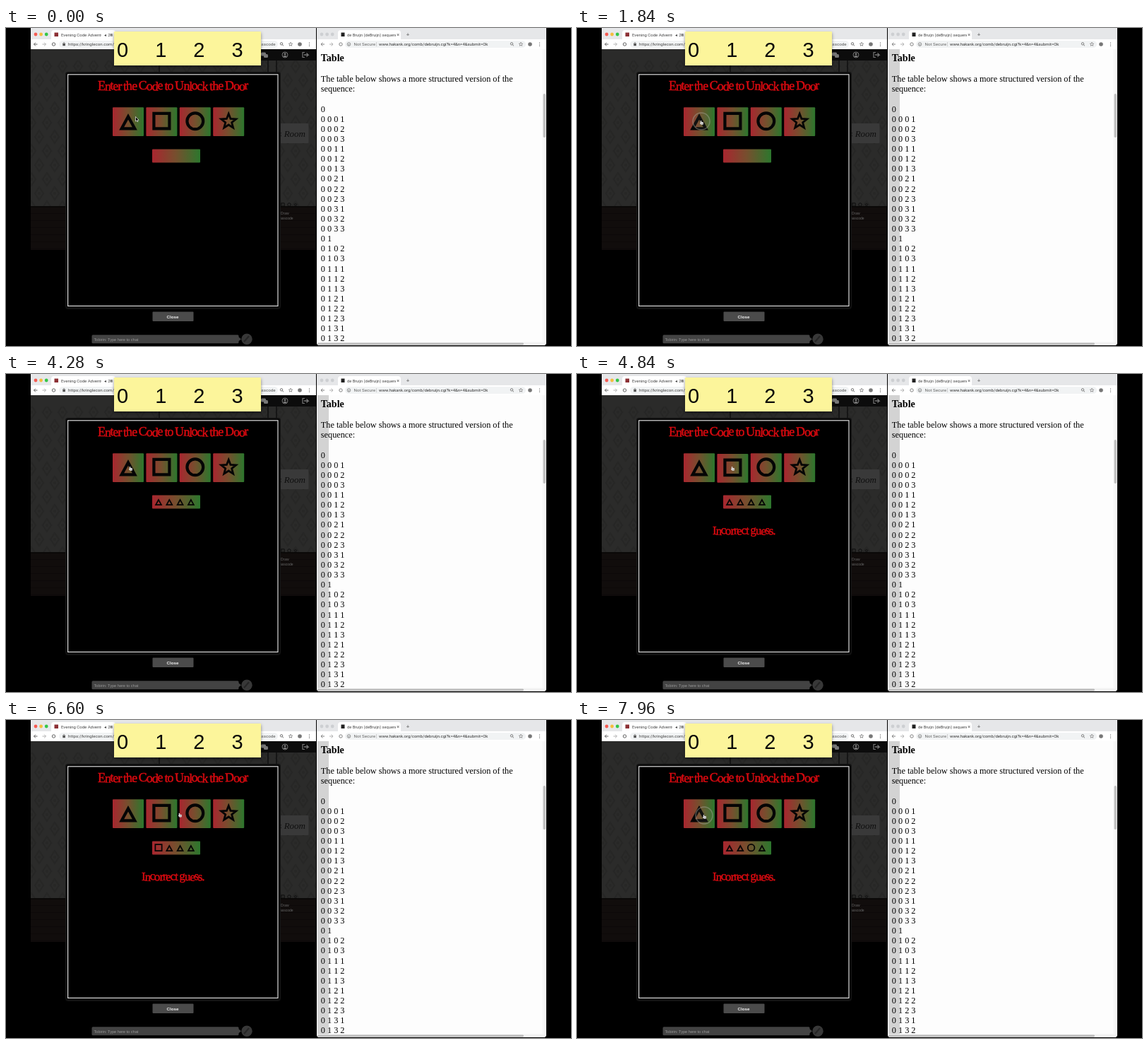
These frames come from a looping animation (800 px wide and 450 px high, 8 s). An HTML page with a canvas:

```html
<!DOCTYPE html>
<html lang="en">
<head>
<meta charset="utf-8">
<title>Door code</title>
<style>
html, body { margin: 0; width: 100%; height: 100%; overflow: hidden; background: #000; }
canvas { display: block; width: 800px; height: 450px; }
</style>
</head>
<body>
<canvas id="stage" width="800" height="450"></canvas>
<script>
const ctx = document.getElementById('stage').getContext('2d');
const LOOP = 8000;
const SANS = '"Liberation Sans", Arial, sans-serif';
const SERIF = '"Liberation Serif", Times, serif';
const UI = 'Roboto, sans-serif';
const ENTRY_DELAY = 200;
const MESSAGE_AT = 4450;
const SHADOW_AT = 40;

// [mouse down time, symbol]
const clicks = [
  [1740, 0], [2400, 0], [3200, 0], [3750, 0], [4850, 1],
  [5560, 0], [5820, 0], [6100, 0], [6780, 2], [7420, 0], [7860, 0]
];

// [time, x, y]
const path = [
  [0, 184, 128], [800, 184, 128], [1500, 176, 133], [4330, 176, 133],
  [4750, 220, 133], [5050, 220, 133], [5420, 178, 136], [6325, 178, 136],
  [6725, 266, 133], [7050, 266, 133], [7360, 180, 136], [8000, 180, 136]
];

function box(x, y, w, h, fill, r = 0) {
  ctx.fillStyle = fill;
  ctx.beginPath();
  ctx.roundRect(x, y, w, h, r);
  ctx.fill();
}

function dot(x, y, r, fill) {
  ctx.fillStyle = fill;
  ctx.beginPath();
  ctx.arc(x, y, r, 0, 7);
  ctx.fill();
}

function line(points, color, width = 1, close = false) {
  ctx.strokeStyle = color;
  ctx.lineWidth = width;
  ctx.beginPath();
  points.forEach(([x, y]) => ctx.lineTo(x, y));
  if (close) ctx.closePath();
  ctx.stroke();
}

function ring(x, y, r, color, width = 1) {
  ctx.strokeStyle = color;
  ctx.lineWidth = width;
  ctx.beginPath();
  ctx.arc(x, y, r, 0, 7);
  ctx.stroke();
}

function text(str, x, y, font, color, align = 'left') {
  ctx.font = font;
  ctx.fillStyle = color;
  ctx.textAlign = align;
  ctx.fillText(str, x, y);
}

// Storybook lettering: tight and heavy, with a slight bob
function whimsy(str, x, y, size, spacing) {
  ctx.font = `${size}px ${SERIF}`;
  ctx.fillStyle = ctx.strokeStyle = '#d80a10';
  ctx.lineWidth = 0.5;
  ctx.textAlign = 'left';
  [...str].forEach((ch, i) => {
    ctx.save();
    ctx.translate(x, y + Math.sin(i * 2.3) * 0.7);
    ctx.rotate(Math.sin(i * 1.7) * 0.05);
    ctx.fillText(ch, 0, 0);
    ctx.strokeText(ch, 0, 0);
    ctx.restore();
    x += ctx.measureText(ch).width + spacing;
  });
}

function star(x, y, outer, inner) {
  return Array.from({ length: 10 }, (_, i) => {
    const r = i % 2 ? inner : outer;
    const a = -Math.PI / 2 + i * Math.PI / 5;
    return [x + r * Math.cos(a), y + r * Math.sin(a)];
  });
}

function symbol(kind, x, y, scale, color = '#050505') {
  ctx.save();
  ctx.translate(x, y);
  ctx.scale(scale, scale);
  if (kind === 0) line([[0, -6.5], [-9.3, 10.5], [9.3, 10.5]], color, 4.2, true);
  if (kind === 1) line([[-11, -11], [11, -11], [11, 10.5], [-11, 10.5]], color, 4.2, true);
  if (kind === 2) ring(0, 0, 11.4, color, 4.2);
  if (kind === 3) line(star(0, 0.5, 11, 4.7), color, 2.8, true);
  ctx.restore();
}

function festive(x, y, w, h) {
  const g = ctx.createLinearGradient(x, 0, x + w, 0);
  g.addColorStop(0, '#a9262f');
  g.addColorStop(0.5, '#75502e');
  g.addColorStop(1, '#2c772d');
  box(x, y, w, h, g, 1);
}

// Words of the four-letter de Bruijn sequence
function lyndonRows(n, k, count) {
  const rows = [];
  let w = [0];
  while (w.length && rows.length < count) {
    if (n % w.length === 0) rows.push(w.join(' '));
    const base = w;
    w = Array.from({ length: n }, (_, i) => base[i % base.length]);
    while (w.length && w[w.length - 1] === k - 1) w.pop();
    if (w.length) w[w.length - 1]++;
  }
  return rows;
}
const rows = lyndonRows(4, 4, 24);

function navArrows(x, color) {
  line([[x + 5, 23], [x, 23], [x + 2.4, 20.6]], color, 0.9);
  line([[x, 23], [x + 2.4, 25.4]], color, 0.9);
  line([[x + 12, 23], [x + 17, 23], [x + 14.6, 20.6]], '#aaa', 0.9);
  line([[x + 17, 23], [x + 14.6, 25.4]], '#aaa', 0.9);
  ring(x + 28, 23, 2.2, color, 0.9);
}

function barIcons(x, color) {
  ring(x, 22.3, 1.7, color, 0.8);
  line([[x + 1.2, 23.5], [x + 3, 25.3]], color, 0.9);
  line(star(x + 13, 23, 2.8, 1.3), color, 0.6, true);
  dot(x + 26, 23, 2.8, '#777');
  for (const y of [20.8, 23, 25.2]) dot(x + 39.5, y, 0.6, color);
}

function chrome(x, w, tabX, tabW, lights) {
  box(x, 0, w, 17, '#e6e7e9');
  box(tabX, 3, tabW, 14, '#fff', [4, 4, 0, 0]);
  box(x, 16, w, 14, '#fff');
  lights.forEach((c, i) => dot(x + 7 + i * 7.6, 9, 2.4, c));
}

function leftWindow() {
  box(35, 30, 404, 224, '#2b2b2a');
  // faint wallpaper ornaments
  ctx.save();
  ctx.beginPath();
  ctx.rect(35, 46, 404, 207);
  ctx.clip();
  for (let r = 0; r < 11; r++) {
    for (let c = 0; c < 20; c++) {
      const x = 36 + c * 22 + (r % 2) * 11, y = 54 + r * 20;
      line([[x, y - 9], [x + 6, y], [x, y + 9], [x - 6, y]], '#272726', 2, true);
      dot(x, y, 2, '#272726');
    }
  }
  ctx.restore();
  box(35, 253, 404, 62, '#110d0c');
  for (let y = 262; y < 314; y += 10) box(35, y, 404, 0.7, '#0c0909');
  box(35, 252, 404, 2, '#0b0908');
  box(35, 314, 404, 136, '#000');

  box(153, 30, 286, 16, '#0c0c0c');
  for (const x of [217, 371, 383]) line([[x, 46], [x, 63]], '#111', 1.5);
  box(361, 34.5, 7, 5, '#777', 1.5);
  box(365, 37, 6, 5, '#777', 1.5);
  ring(395, 38, 4, '#777', 1);
  dot(395, 36.7, 1.5, '#777');
  box(392.7, 39, 4.6, 2, '#777', 1);
  line([[423, 34.5], [420, 34.5], [420, 41.5], [423, 41.5]], '#777', 1.2);
  line([[422, 38], [428, 38], [425.5, 35.5]], '#777', 1.3);
  line([[428, 38], [425.5, 40.5]], '#777', 1.3);

  box(380, 135, 48.5, 28, '#393939', 1);
  text('s Room', 424, 154, `italic 13px ${SERIF}`, '#101010', 'right');
  [1, 2, 3].forEach((k, i) => symbol(k, 392 + i * 9, 250, 0.2, '#0a0a0a'));
  text('Draw', 389, 264, `5px ${SANS}`, '#666');
  text('asscode', 388, 270.5, `5px ${SANS}`, '#666');

  chrome(35, 404, 64, 91, ['#f45b53', '#f5bd3c', '#35c648']);
  box(68.5, 6.5, 5.5, 5.5, '#8c3035');
  text('Evening Code Adventure 20', 78, 11.5, `6px ${UI}`, '#444');
  box(135, 4, 8, 10, '#fff');
  text('◂', 139, 11.5, `6px ${UI}`, '#444');
  text('×', 147, 11.5, `7px ${UI}`, '#555');
  navArrows(39.5, '#555');
  box(75, 18, 310, 10, '#f1f3f4', 5);
  box(80.3, 22, 3.6, 3.2, '#555');
  ring(82.1, 21.8, 1.2, '#555', 0.7);
  text('https://kringlecon.com/?modal=challenge', 88, 25, `6.2px ${UI}`, '#444');
  text('passcode', 381.5, 25, `6.2px ${UI}`, '#555', 'right');
  barIcons(390, '#555');
}

function rightWindow(t) {
  box(440, 0, 325, 449, '#fdfdfd', [0, 0, 4, 4]);
  chrome(440, 325, 470, 89, ['#cdcfd2', '#cdcfd2', '#cdcfd2']);
  box(474.5, 6.5, 5, 5.5, '#222');
  text('de Bruijn (deBruijn) sequence', 483, 11.5, `5.7px ${UI}`, '#444');
  box(552, 4, 6, 10, '#fff');
  text('×', 555, 12, `7px ${UI}`, '#555', 'center');
  text('+', 569, 12, `8px ${UI}`, '#666', 'center');
  navArrows(446, '#777');
  box(480, 18, 256, 10, '#f1f3f4', 5);
  ring(485.5, 23, 2.3, '#666', 0.7);
  box(485.1, 22.4, 0.8, 2, '#666');
  text('Not Secure', 492.5, 25, `6.2px ${UI}`, '#666');
  box(524.5, 20, 0.5, 6, '#aaa');
  text('www.hakank.org/comb/debruijn.cgi?k=4&n=4&submit=Ok', 528, 25, `6px ${UI}`, '#333');
  barIcons(716, '#666');

  // shadow cast by the window in front
  if (t >= SHADOW_AT) box(441, 30, 16, 415, '#d3d3d3');

  text('Table', 445.8, 46.5, `bold 14px ${SERIF}`, '#000');
  const body = `12.25px ${SERIF}`;
  text('The table below shows a more structured version of the', 445.8, 76.2, body, '#000');
  text('sequence:', 445.8, 90.2, body, '#000');
  rows.forEach((row, i) => text(row, 445.8, 118.5 + i * 14.13, body, '#000'));

  box(759.5, 30, 5.5, 415, '#f7f7f7');
  box(760.5, 93, 3.6, 62, '#c1c1c1', 1.8);
  box(440, 444.5, 325, 4.5, '#f3f3f3', [0, 0, 4, 4]);
  box(441, 445.6, 292, 2.8, '#bdbdbd', 1.4);
}

function modal() {
  box(84, 62, 305, 336, '#111', 4);
  box(86, 64, 301, 331, '#000');
  ctx.strokeStyle = '#dcdcdc';
  ctx.lineWidth = 1.2;
  ctx.strokeRect(87.6, 65.8, 297.4, 327.6);
  whimsy('Enter the Code to Unlock the Door', 130, 87.8, 18, -1.2);

  box(207.5, 401.5, 58, 13.5, '#4b4b4b', 1);
  text('Close', 236, 410.7, `bold 6.2px ${SANS}`, '#ededed', 'center');

  box(121.5, 434.3, 208, 12, '#434343', 1.5);
  ctx.fillStyle = '#434343';
  ctx.beginPath();
  ctx.moveTo(329, 437);
  ctx.lineTo(333, 440.3);
  ctx.lineTo(329, 443.5);
  ctx.fill();
  text('Tobirin: Type here to chat', 124.5, 442.5, `5.6px ${SANS}`, '#999');
  dot(341, 440.3, 7.7, '#383838');
  line([[337, 444], [344, 436]], '#262626', 2);
}

function note() {
  ctx.save();
  ctx.shadowColor = 'rgba(0,0,0,.45)';
  ctx.shadowBlur = 4;
  ctx.shadowOffsetY = 1.5;
  box(153, 5, 208, 48, '#fcf59b');
  ctx.restore();
  [0, 1, 2, 3].forEach(n => text(n, 165 + n * 54.2, 40.5, `29px ${SANS}`, '#080808', 'center'));
}

function keypad(t) {
  for (let k = 0; k < 4; k++) {
    const x = 151 + k * 47.4;
    const pressed = clicks.some(([at, s]) => s === k && t >= at - 60 && t < at + 90);
    const dy = pressed ? 0.8 : 0;
    festive(x, 112.3 + dy, 44, 40.7);
    symbol(k, x + 22, 131.8 + dy, 1);
  }
  festive(207, 171.5, 68, 19);
  clicks.filter(([at]) => t >= at + ENTRY_DELAY).slice(-4)
    .forEach(([, k], i) => symbol(k, 216 + i * 15.3, 180.7, 0.42));
  if (t >= MESSAGE_AT) whimsy('Incorrect guess.', 192, 227, 17, -1.2);
}

function cursorAt(t) {
  const i = Math.max(1, path.findIndex(p => p[0] > t));
  const [t0, x0, y0] = path[i - 1], [t1, x1, y1] = path[i];
  const u = (t - t0) / (t1 - t0), e = u * u * (3 - 2 * u);
  return [x0 + (x1 - x0) * e, y0 + (y1 - y0) * e];
}

function pointer(t) {
  const [x, y] = cursorAt(t);
  if (clicks.some(([at]) => t >= at && t < at + 220)) {
    dot(x, y - 1, 12, 'rgba(130,130,120,.1)');
    ring(x, y - 1, 12, 'rgba(170,170,160,.45)', 1.5);
  }
  ctx.save();
  ctx.translate(x, y);
  if (t < 900) {
    ctx.beginPath();
    [[-0.5, -2.5], [-0.5, 4], [1, 2.8], [2, 4.8], [3, 4.3], [2, 2.4], [4, 2.2]]
      .forEach(p => ctx.lineTo(...p));
    ctx.closePath();
    ctx.fillStyle = '#000';
    ctx.fill();
    ctx.strokeStyle = '#eee';
    ctx.lineWidth = 0.7;
    ctx.stroke();
  } else {
    box(-1.2, -2, 1.5, 4.5, '#ddd', 0.7);
    box(-1, 0, 4, 3.8, '#ddd', 1.1);
    box(-2, 1, 1.6, 1.6, '#ddd', 0.7);
    line([[1, 1], [1, 2.8]], '#666', 0.4);
    line([[2.1, 1], [2.1, 2.8]], '#666', 0.4);
  }
  ctx.restore();
}

const start = performance.now();
function frame() {
  const t = (performance.now() - start) % LOOP;
  box(0, 0, 800, 450, '#000');
  leftWindow();
  rightWindow(t);
  modal();
  note();
  keypad(t);
  pointer(t);
  requestAnimationFrame(frame);
}
frame();
</script>
</body>
</html>
```
